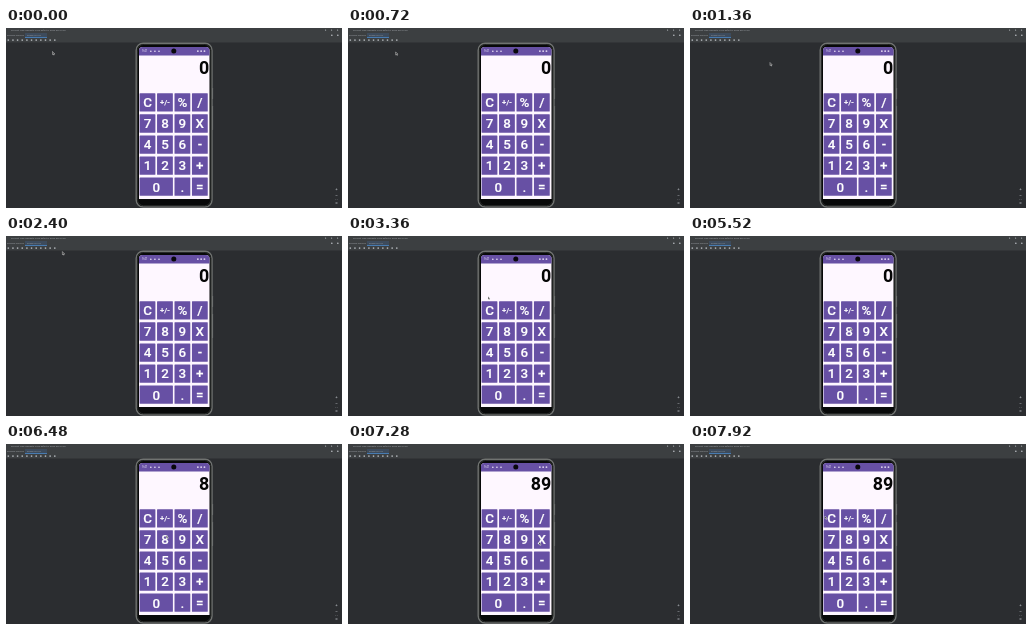
These frames come from a looping animation (336x180 px, 8000 ms). An HTML page:

```html
<!DOCTYPE html>
<html lang="en">
<head>
<meta charset="utf-8">
<title>Calculator</title>
<style>
  html, body { margin: 0; width: 100%; height: 100%; overflow: hidden; background: #2b2d30; }
  svg { display: block; width: 100vw; height: 100vh; }
  text { font-family: Roboto, "Liberation Sans", sans-serif; }
  .tiny { font-size: 2.3px; fill: #9da1a6; }
  .label { font-size: 13.4px; font-weight: 500; fill: #fff; stroke: #fff; stroke-width: .2; text-anchor: middle; }
  .label.small { font-size: 7.6px; }
  #display { font-size: 17.9px; font-weight: 700; fill: #050505; text-anchor: end; }
</style>
</head>
<body>
<svg viewBox="0 0 336 180">
  <rect width="336" height="180" fill="#2b2d30"/>
  <rect width="336" height="14.5" fill="#3c3f41"/>
  <rect x="19" y="5" width="22" height="5" fill="#3d4b5c"/>
  <rect x="19" y="9.2" width="22" height=".8" fill="#4a88c7"/>
  <text class="tiny" x="5" y="3.3">File  Edit  View  Navigate  Code  Refactor  Build  Run  Tools</text>
  <text class="tiny" x="1" y="8.2">Running Devices</text>
  <text class="tiny" x="21" y="8.2">Phone API 34</text>
  <g id="tools" fill="#a5a9ad"></g>

  <g fill="#686b6c">
    <rect x="205.5" y="60" width="1.6" height="11" rx=".6"/>
    <rect x="205.5" y="78" width="1.6" height="24" rx=".6"/>
  </g>
  <rect x="130.2" y="15.2" width="75.8" height="163.8" rx="7" fill="#080909" stroke="#707371" stroke-width="1.4"/>
  <rect x="131.5" y="16.5" width="73.2" height="161.2" rx="6" fill="none" stroke="#303332" stroke-width=".8"/>
  <path d="M133 171V22.5q0-3.5 3.5-3.5H200q3.5 0 3.5 3.5V171z" fill="#fef7ff"/>
  <path d="M133 27.5v-5q0-3.5 3.5-3.5H200q3.5 0 3.5 3.5v5z" fill="#6750a4"/>
  <circle cx="167.8" cy="23" r="2.5" fill="#08070b"/>
  <text x="136" y="24.1" font-size="2.7" fill="#eee8fa">9:41</text>
  <g id="status" fill="#d5cae9"></g>
  <text id="display" x="203.2" y="46.1">0</text>
  <g id="keys"></g>

  <g fill="#a5a9ad">
    <path d="M329.5 161h2v.5h-2zM330.2 160.2h.5v2h-.5zM329.5 167h2v.5h-2z"/>
    <text class="tiny" x="329" y="172">1:1</text>
    <path d="M329.5 174h2v.5h-2zM329.5 175.5h2v.5h-2z"/>
  </g>
  <path id="cursor" d="M0 0V3.8L.9 3 1.6 4.5 2.2 4.2 1.6 2.8H2.7z" fill="#222" stroke="#fff" stroke-width=".5"/>
</svg>
<script>
const LOOP = 8000, STEP = 80;
const $ = id => document.getElementById(id);

function add(parent, tag, attrs, text = '') {
  const el = document.createElementNS('http://www.w3.org/2000/svg', tag);
  for (const k in attrs) el.setAttribute(k, attrs[k]);
  el.textContent = text;
  parent.append(el);
  return el;
}

function dots(parent, count, x, y, gap, size) {
  for (let i = 0; i < count; i++) {
    add(parent, 'rect', { x: x + i * gap, y, width: size, height: size, rx: size / 3 });
  }
}
dots($('tools'), 11, 1.5, 11.3, 4.65, 1.6);
dots($('tools'), 3, 319, 1.5, 6, 1.2);
dots($('tools'), 2, 325, 6.5, 6, 1.6);
dots($('status'), 3, 144, 22.4, 4.1, 1.6);
dots($('status'), 3, 191, 22.3, 3.3, 1.7);

// Keypad
const ripples = {};
const rows = ['C ± % /', '7 8 9 X', '4 5 6 -', '1 2 3 +', '0 _ . ='];
rows.forEach((row, r) => row.split(' ').forEach((name, c) => {
  if (name === '_') return;
  const small = name === '±';
  const x = 133.6 + c * 17.45, y = 65.3 + r * 21.05;
  const width = name === '0' ? 33.3 : 15.8, height = 18.3;
  const box = { x, y, width, height, rx: .5 };
  add($('keys'), 'rect', { ...box, fill: '#6750a4' });
  ripples[name] = add($('keys'), 'rect', { ...box, fill: '#fff', opacity: 0 });
  add($('keys'), 'text', {
    class: small ? 'label small' : 'label',
    x: x + width / 2,
    y: y + (small ? 11.7 : 14)
  }, small ? '+/-' : name);
}));

// Pointer moves; it rests between them
const home = { x: 46.5, y: 23.5 };
const moves = [
  { from: 640, to: 1360, x: 80, y: 34.5 },
  { from: 1360, to: 1600, x: 60, y: 26 },
  { from: 2000, to: 2560, x: 55.5, y: 13 },
  { from: 2880, to: 3360, x: 140, y: 60.5 },
  { from: 3360, to: 3520, x: 166, y: 66 },
  { from: 3680, to: 3920, x: 188, y: 48 },
  { from: 3920, to: 4480, x: 160.3, y: 91.3 },
  { from: 6480, to: 6720, x: 175, y: 95 },
  { from: 6960, to: 7280, x: 191, y: 98 },
  { from: 7440, to: 7920, x: 135, y: 72 }
];
const presses = [['8', 6080], ['9', 6800]];

const clamp = v => Math.min(1, Math.max(0, v));
const ease = k => k * k * (3 - 2 * k);

function pointerAt(t) {
  let { x, y } = home;
  for (const m of moves) {
    const k = ease(clamp((t - m.from) / (m.to - m.from)));
    x += (m.x - x) * k;
    y += (m.y - y) * k;
  }
  return [x, y];
}

function draw(now) {
  const t = Math.floor(now % LOOP / STEP) * STEP;
  $('cursor').setAttribute('transform', `translate(${pointerAt(t)}) scale(.8)`);
  let value = '';
  for (const [name, start] of presses) {
    const age = t - start;
    if (age >= 80) value += name;
    ripples[name].setAttribute('opacity', age >= 0 && age < 160 ? .16 - age * .001 : 0);
  }
  $('display').textContent = value || '0';
}

const begin = performance.now();
function tick() {
  draw(performance.now() - begin);
  requestAnimationFrame(tick);
}
tick();
</script>
</body>
</html>
```
